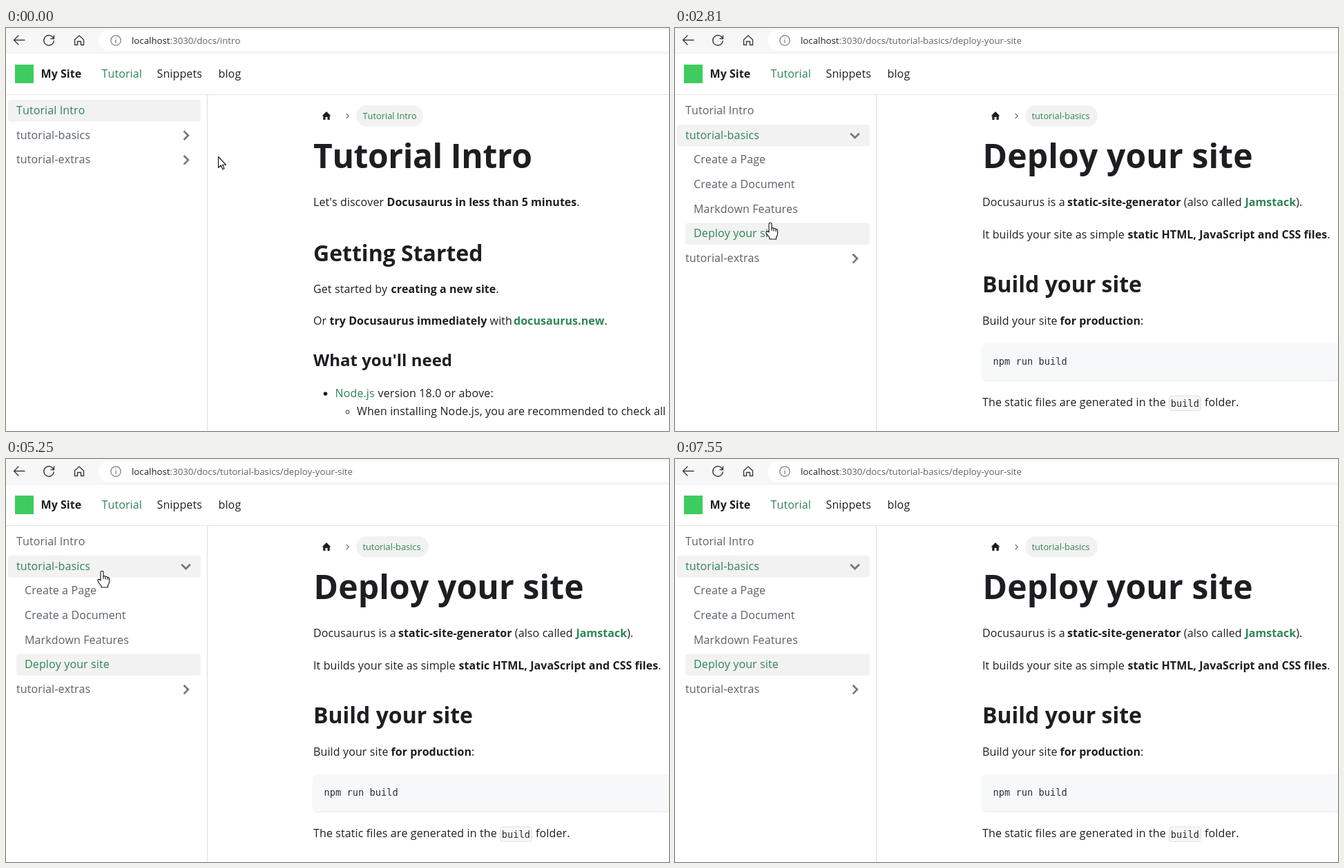
These frames come from a looping animation (960 by 584 pixels, 8020 ms). An HTML page:

```html
<!DOCTYPE html>
<html lang="en">
<head>
<meta charset="utf-8">
<title>Docs sidebar</title>
<style>
  html, body { margin: 0; width: 100%; height: 100%; overflow: hidden; background: #fff; }
  svg { display: block; width: 960px; height: 584px; }
  text { font: 16px "Open Sans", "Noto Sans", sans-serif; font-kerning: none; letter-spacing: .12px; fill: #1c1e21; }
  .b { font-weight: 700; letter-spacing: .04px; }
  .h1, .h2, .h3 { font-weight: 700; letter-spacing: 0; }
  .h1 { font-size: 48px; letter-spacing: .15px; }
  .h1.tight { letter-spacing: -.4px; }
  .h2 { font-size: 32px; }
  .h3 { font-size: 24px; }
  .g { fill: #2e8555; }
  .m { font: 13.7px "DejaVu Sans Mono", "Noto Sans Mono", monospace; letter-spacing: 0; fill: #2b2d30; }
  .arr { font-family: "DejaVu Sans", sans-serif; }
  .crumb { font-size: 12.8px; letter-spacing: 0; }
  .title { font-size: 15.3px; letter-spacing: 0; fill: #393a34; }
  .url { font-size: 13.25px; letter-spacing: 0; fill: #636363; }
  .key { fill: #f6f7f8; stroke: #dfe0e1; }
  .block { fill: #f6f8fa; filter: drop-shadow(0 1px 1px rgba(0,0,0,.1)); }
  .row text { fill: #5a6169; }
  .row rect { fill: #f2f2f2; visibility: hidden; }
  .row.lit rect { visibility: visible; }
  .row.on text { fill: #2e8555; }
  .line { fill: none; stroke: #3a3a3a; stroke-width: 1.4; stroke-linecap: round; stroke-linejoin: round; }
  .chev { fill: none; stroke: #757779; stroke-width: 2.7; }
  .sep { fill: none; stroke: #777; stroke-width: 1.3; }
  .cursor { fill: #fff; stroke: #111; stroke-width: 1.1; stroke-linejoin: round; }
</style>
</head>
<body>
<svg viewBox="0 0 960 584">
  <defs><clipPath id="fold"><rect id="foldBox" x="0" y="171.5" width="290" height="0"/></clipPath></defs>

  <rect width="960" height="37" fill="#f7f7f7"/>
  <rect x="134" y="3" width="860" height="30" rx="15" fill="#fff"/>
  <path d="M0 36.5H960" stroke="#ededed"/>
  <g class="line">
    <path d="M27 17.5H11.5M18 11L11.5 17.5L18 24"/>
    <path d="M69 15.5A7.3 7.3 0 1 0 69.3 19M69.5 11V15.5H65"/>
    <path d="M99.5 17L106 11L112.5 17V24.5H108.5V19.5H103.5V24.5H99.5Z"/>
    <g stroke="#777" stroke-width="1.2"><circle cx="159" cy="18" r="7.2"/><path d="M159 17V21.5M159 14.4V14.5"/></g>
  </g>
  <text class="url" x="182" y="22.5"><tspan fill="#222">localhost</tspan><tspan id="path"></tspan></text>

  <rect x="13" y="53" width="27" height="27" fill="#3ecc5f"/>
  <text class="b" x="50.5" y="72">My Site</text>
  <text class="g" x="138.5" y="72">Tutorial</text>
  <text x="218.5" y="72">Snippets</text>
  <text x="307.5" y="72">blog</text>
  <path d="M0 96.5H960" stroke="#e3e4e5"/>
  <path d="M291.5 97V584" stroke="#dadde1"/>

  <g id="side"></g>
  <g id="sub" clip-path="url(#fold)"></g>
  <g id="extras"></g>
  <g id="pages">
    <path d="M457.5 127.5L464 121L470.5 127.5H468.7V133H465.5V129H462.5V133H459.3V127.5Z" fill="#1c1e21"/>
    <path class="sep" d="M492.7 124L496.2 127.5L492.7 131"/>
  </g>

  <g id="cursor" class="cursor">
    <path id="arrow" d="M.5 .5V16.5L4.2 13L6.7 18.8L9 17.8L6.5 12.2H11.5Z"/>
    <g id="hand">
      <path d="M-2 13V2Q-2 .3 0 .3T2 2V8Q3.6 6.8 5 8.5Q7 7.7 8 9.6Q10.3 9 10.5 11.5V16Q10.5 19 8.5 21V24H-1V22Q-4 18.5 -6 15Q-6.2 12.6 -4.6 12.4Q-3 12.6 -2 14Z"/>
      <path d="M2 8V12M5 8.5V12.5M8 9.6V13" fill="none"/>
    </g>
  </g>
</svg>

<script>
const LOOP = 8020, PITCH = 35.68, OPEN = 4 * PITCH, UNFOLD = 1204;
const $ = id => document.getElementById(id);
const put = (id, html) => $(id).insertAdjacentHTML('beforeend', html);

// Markup helpers
const text = (x, y, s, cls = '') => `<text x="${x}" y="${y}" class="${cls}">${s}</text>`;
const run = (x, s, cls = 'b') => `<tspan x="${x}" class="${cls}">${s}</tspan>`;
const bold = s => `<tspan class="b">${s}</tspan>`;
const codeWidth = s => s.length * 8.25 + 5.5;
const code = (x, y, s) =>
  `<rect class="key" x="${x + .5}" y="${y - 16}" width="${codeWidth(s) - 1}" height="21.5" rx="4"/>` +
  text(x + 2.7, y, s, 'm');
const pill = (x, w, s) =>
  `<rect x="${x}" y="112" width="${w}" height="30.5" rx="15.25" fill="#f2f2f2"/>` +
  text(x + 9.5, 131.5, s, 'crumb g');
const subCrumb = (w, s) => text(516.5, 131.5, 'tutorial-basics', 'crumb') +
  '<path class="sep" d="M622.7 124L626.2 127.5L622.7 131"/>' + pill(637, w, s);
const block = (y, h) => `<rect class="block" x="445" y="${y}" width="530" height="${h}" rx="6"/>`;
const titled = (y, s) => block(y, 200) + text(461, y + 30, s, 'title') +
  `<path d="M445 ${y + 49.5}H960" stroke="#dadde1"/>`;
const dot = y => `<circle cx="462.5" cy="${y}" r="2.8" fill="#1c1e21"/>`;
const route = (y, file, url) => {
  const end = 477 + codeWidth(file);
  return dot(y - 5) + code(477, y, file) + text(end + 5, y - 1, '→', 'arr') + code(end + 25, y, url);
};

const pages = {
  intro: {
    path: 'intro', rows: [0], lit: [0],
    html: pill(507, 97, 'Tutorial Intro') +
      text(445, 203, 'Tutorial Intro', 'h1 tight') +
      text(445, 258, `Let's discover ${run(551.5, 'Docusaurus in less than 5 minutes')}.`) +
      text(445, 337.5, 'Getting Started', 'h2') +
      text(445, 384, `Get started by ${run(557.5, 'creating a new site')}.`) +
      text(445, 429.5, `Or ${run(468.5, 'try Docusaurus immediately')} with ${run(735, 'docusaurus.new', 'b g')}.`) +
      text(445, 490, "What you'll need", 'h3') +
      dot(530) + text(476.5, 534.5, `<tspan class="g">Node.js</tspan> ${run(538.5, 'version 18.0 or above:', '')}`) +
      '<circle cx="494.5" cy="556.5" r="2.5" fill="none" stroke="#1c1e21"/>' +
      text(508, 561, 'When installing Node.js, you are recommended to check all')
  },
  deploy: {
    path: 'tutorial-basics/deploy-your-site', rows: [1, 5], lit: [1, 5],
    html: pill(507, 105, 'tutorial-basics') +
      text(445.5, 203, 'Deploy your site', 'h1') +
      text(445, 258, `Docusaurus is a ${run(568, 'static-site-generator')} (also called ${run(825.5, 'Jamstack', 'b g')}).`) +
      text(445, 304.5, `It builds your site as simple ${run(655.5, 'static HTML, JavaScript and CSS files')}.`) +
      text(445, 383, 'Build your site', 'h2') +
      text(445, 429.5, `Build your site ${run(557.5, 'for production')}:`) +
      block(457, 53.5) + text(460.5, 488, 'npm run build', 'm') +
      text(445, 548, 'The static files are generated in the') +
      code(715, 549, 'build') + text(767, 548, 'folder.')
  },
  markdown: {
    path: 'tutorial-basics/markdown-features', rows: [1, 4], lit: [4],
    html: subCrumb(139, 'Markdown Features') +
      text(445, 203, 'Markdown Features', 'h1 tight') +
      text(445, 258, `Docusaurus supports ${run(610.5, 'Markdown', 'b g')} and a few ${run(779, 'additional features')}.`) +
      text(445, 337.5, 'Front Matter', 'h2') +
      text(445, 384, `Markdown documents have metadata at the top called ${run(865.5, 'Front Matter', 'g')}`) +
      titled(411, 'my-doc.md') +
      '<rect x="445" y="476" width="515" height="108" fill="#dbdce0"/>' +
      ['---', 'id: my-doc-id', 'title: My document title',
        'description: My document description', 'slug: /my-custom-url']
        .map((s, i) => text(460.5, 492.5 + i * 21.7, s, 'm')).join('')
  },
  page: {
    path: 'tutorial-basics/create-a-page', rows: [1, 2], lit: [2],
    html: subCrumb(102, 'Create a Page') +
      text(445, 203, 'Create a Page', 'h1') +
      text(445, 258, `Add ${run(481, 'Markdown or React')} files to`) + code(698, 259, 'src/pages') +
      text(782, 258, `to create a ${run(866.5, 'standalone')}`) +
      route(305.5, 'src/pages/index.js', 'localhost:3000/') +
      route(336.5, 'src/pages/foo.md', 'localhost:3000/foo') +
      route(367.5, 'src/pages/foo/bar.js', 'localhost:3000/foo/bar') +
      text(445, 446.5, 'Create your first React Page', 'h2') +
      text(445, 492.5, 'Create a file at') + code(559, 493.5, 'src/pages/my-react-page.js') + text(779, 492.5, ':') +
      titled(520, 'src/pages/my-react-page.js')
  },
  doc: {
    path: 'tutorial-basics/create-a-document', rows: [1, 3], lit: [3],
    html: subCrumb(136, 'Create a Document') +
      text(445, 203, 'Create a Document', 'h1') +
      text(445, 258, `Documents are ${bold('groups of pages')} connected through:`) +
      dot(300.5) + text(477, 305, `a ${bold('sidebar')}`) +
      dot(331.5) + text(477, 336, bold('previous/next navigation')) +
      dot(362.5) + text(477, 367, bold('versioning')) +
      text(445, 446.5, 'Create your first Doc', 'h2') +
      text(445, 492.5, 'Create a Markdown file at') + code(641, 493.5, 'docs/hello.md') + text(754, 492.5, ':') +
      titled(520, 'docs/hello.md')
  }
};
for (const k in pages) put('pages', `<g id="p-${k}">${pages[k].html}</g>`);

// Sidebar rows
const row = (i, slot, x, label, chev = '') => {
  const y = 104 + slot * PITCH;
  return `<g class="row" id="row${i}"><rect x="${x - 12}" y="${y}" width="${294 - x}" height="31.7" rx="4"/>` +
    text(x, y + 21, label) +
    (chev && `<g transform="translate(260.5 ${y + 16})"><path id="${chev}" class="chev" d="M-3 -6.3L3.3 0L-3 6.3"/></g>`) + '</g>';
};
put('side', row(0, 0, 15, 'Tutorial Intro') + row(1, 1, 15, 'tutorial-basics', 'chevron'));
['Create a Page', 'Create a Document', 'Markdown Features', 'Deploy your site']
  .forEach((s, i) => put('sub', row(i + 2, i + 2, 27, s)));
put('extras', row(6, 2, 15, 'tutorial-extras', 'chevron2'));

// Timeline: page visits, then pointer stops as time, x, y
const visits = [[0, 'intro'], [1200, 'deploy'], [3200, 'markdown'], [4130, 'deploy'],
  [5780, 'page'], [6620, 'doc'], [7430, 'deploy']];
const stops = [[0, 307, 186], [280, 307, 186], [800, 181, 151], [2160, 181, 151], [2640, 140, 293],
  [2810, 138, 282], [2910, 138, 278], [3000, 138, 278], [3130, 138, 262], [3260, 138, 262],
  [3560, 133, 287], [3800, 133, 287], [3890, 140, 288], [4300, 140, 288], [4880, 139, 162],
  [5250, 139, 162], [5440, 140, 186], [6150, 140, 186], [6480, 141, 223], [6860, 141, 223],
  [7360, 139, 289], [LOOP, 139, 289]];

const smooth = p => (p = Math.min(1, Math.max(0, p)), p * p * (3 - 2 * p));
const visitAt = t => visits.filter(v => v[0] <= t).pop()[1];

function pointer(t) {
  const i = stops.findIndex(s => s[0] > t);
  const [t0, x0, y0] = stops[i - 1], [t1, x1, y1] = stops[i];
  const p = smooth((t - t0) / (t1 - t0));
  return [x0 + (x1 - x0) * p, y0 + (y1 - y0) * p];
}

function draw(t) {
  const name = visitAt(t), page = pages[name];
  for (const k in pages) $('p-' + k).style.display = k === name ? '' : 'none';
  // The address changes just before the page does
  $('path').textContent = ':3030/docs/' + pages[visitAt(t + 60)].path;

  const h = OPEN * smooth((t - UNFOLD) / 260);
  $('foldBox').setAttribute('height', h);
  $('extras').setAttribute('transform', `translate(0 ${h})`);
  $('chevron').setAttribute('transform', `rotate(${90 * smooth((t - UNFOLD) / 200)})`);

  const [x, y] = pointer(t), shown = t < 7550;
  let over = x < 282 ? Math.floor((y - 102) / PITCH) : -1;
  if (over === 2 && h === 0) over = 6;
  for (let i = 0; i < 7; i++) {
    const c = $('row' + i).classList;
    c.toggle('on', page.rows.includes(i));
    c.toggle('lit', page.lit.includes(i) || (shown && over === i));
  }
  $('cursor').style.display = shown ? '' : 'none';
  $('cursor').setAttribute('transform', `translate(${x} ${y})`);
  $('hand').style.display = over < 0 ? 'none' : '';
  $('arrow').style.display = over < 0 ? '' : 'none';
}

const start = performance.now();
function tick() {
  draw((performance.now() - start) % LOOP);
  requestAnimationFrame(tick);
}
tick();
</script>
</body>
</html>
```
